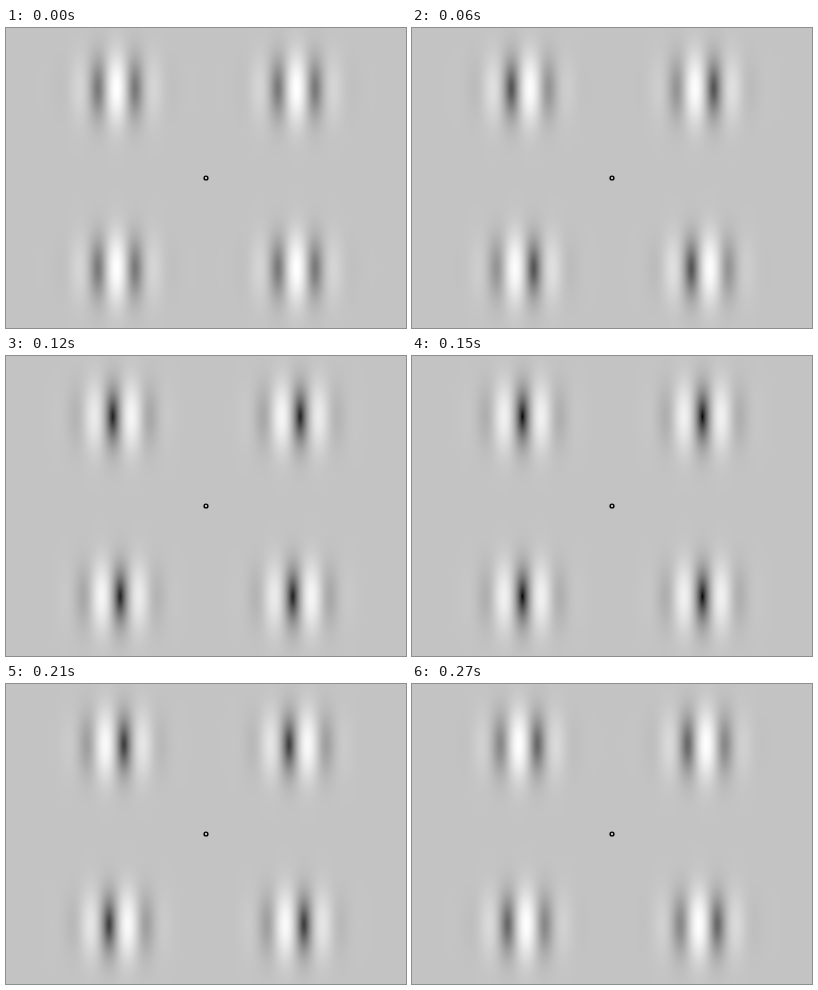
An HTML page with a canvas for the animation above (0.3 s loop, 400 by 300 pixels).

```html
<!DOCTYPE html>
<html lang="en">
<head>
<meta charset="utf-8">
<title>Drifting gratings</title>
<style>
  html, body { margin: 0; width: 100%; height: 100%; overflow: hidden; background: #c3c3c3; }
  canvas { display: block; width: 400px; height: 300px; }
</style>
</head>
<body>
<canvas id="stage" width="400" height="300"></canvas>
<script>
const W = 400, H = 300;
const STEP = 30, STEPS = 10;            // ms per step, steps per loop
const PERIOD = 40, SIGMA = 23, GAMMA = 2.6;
const ctx = document.getElementById('stage').getContext('2d');
const image = ctx.createImageData(W, H);

const bell = d => Math.exp(-d * d / (2 * SIGMA * SIGMA));
const grey = g => Math.round(255 * Math.pow(Math.max(0, 0.5 + 0.5 * g), 1 / GAMMA));

// Each quadrant holds one patch; diagonal neighbours drift the same way.
function drawPatches(step) {
  const shift = step * PERIOD / STEPS;
  for (let y = 0; y < H; y++) {
    const bottom = y >= H / 2;
    const fade = bell(y - (bottom ? 240 : 60));
    for (let x = 0; x < W; x++) {
      const right = x >= W / 2;
      const dx = x - (right ? 290 : 110);
      const dir = right === bottom ? 1 : -1;
      const wave = Math.cos(2 * Math.PI * (dx - dir * shift) / PERIOD);
      const v = grey(wave * bell(dx) * fade);
      const i = (y * W + x) * 4;
      image.data[i] = image.data[i + 1] = image.data[i + 2] = v;
      image.data[i + 3] = 255;
    }
  }
  ctx.putImageData(image, 0, 0);
}

function drawFixation() {
  ctx.beginPath();
  ctx.arc(200, 150, 1.9, 0, 2 * Math.PI);
  ctx.lineWidth = 1.4;
  ctx.strokeStyle = '#000';
  ctx.stroke();
}

let shown = -1;
let start = null;
function tick(now) {
  if (start === null) start = now;
  const step = Math.floor(Math.max(0, now - start) / STEP + 1e-6) % STEPS;
  if (step !== shown) {
    drawPatches(step);
    drawFixation();
    shown = step;
  }
  requestAnimationFrame(tick);
}
requestAnimationFrame(tick);
</script>
</body>
</html>
```
